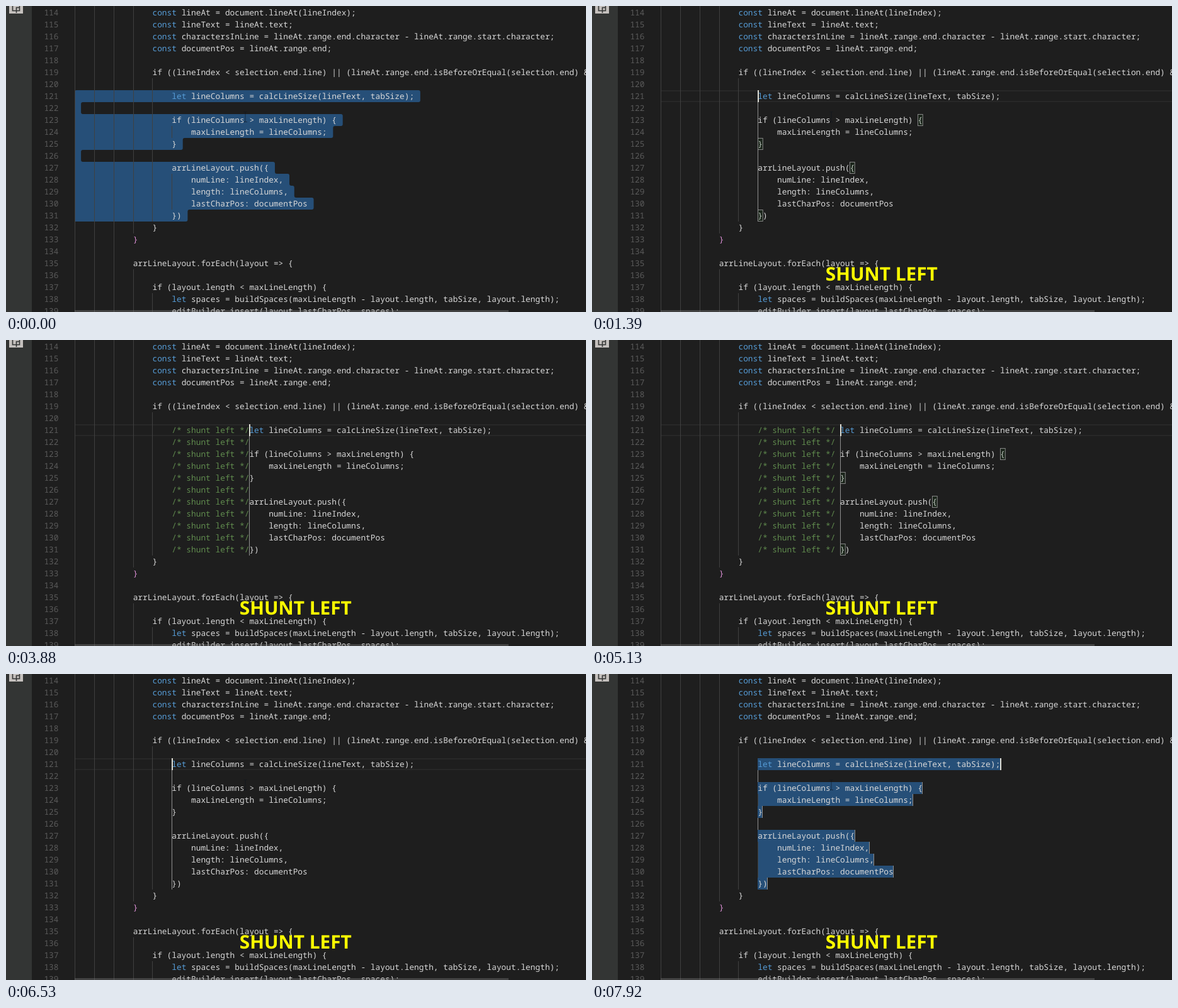
Recreate the animation shown at these times as an HTML page. Size 921 by 487 pixels, loop 8000 ms.

```html
<!DOCTYPE html>
<html lang="en">
<head>
<meta charset="utf-8">
<title>Shunt left</title>
<style>
  html, body { margin: 0; width: 100%; height: 100%; overflow: hidden; background: #1e1e1e; }
  svg { display: block; }
  text { white-space: pre; text-rendering: geometricPrecision; }
  .code { font: 12.83px "Noto Sans Mono", "DejaVu Sans Mono", monospace; fill: #d8d8d8; }
  .code .num { fill: #5a5a5a; }
  .code .key { fill: #569cd6; }
  .code .note { fill: #608b4e; }
  .code .pink { fill: #da8fd4; }
  .title { font: 700 29.8px "Open Sans", "Noto Sans", sans-serif; fill: #ff0; }
</style>
</head>
<body>
<svg id="stage" width="921" height="487" viewBox="0 0 921 487"></svg>
<script>
const LOOP = 8000, LEFT = 109.3, CHAR = 7.697, ROW = 19;
const FIRST = 121, INDENT = 20, TAG = '/* shunt left */';
const stage = document.getElementById('stage');
const timed = [];

const colX = col => LEFT + col * CHAR;
const rowY = line => 1 + (line - 114) * ROW;

function add(parent, tag, attrs = {}, content = '') {
  const el = document.createElementNS('http://www.w3.org/2000/svg', tag);
  for (const name in attrs) el.setAttribute(name, attrs[name]);
  el.textContent = content;
  return parent.appendChild(el);
}
const group = (parent, attrs) => add(parent, 'g', attrs);
const box = (parent, x, y, width, height, fill, more) =>
  add(parent, 'rect', { x, y, width, height, fill, ...more });

// Shows an element only during the given [from, to) spans.
function during(el, ...spans) {
  timed.push({ el, spans });
  return el;
}

// Places each word on the character grid.
function write(parent, line, col, str, cls) {
  for (const m of str.matchAll(/\S+/g)) {
    const kind = cls || (/^(const|let)$/.test(m[0]) ? 'key' : '');
    add(parent, 'text', { x: colX(col + m.index), y: rowY(line) + 14, class: kind }, m[0]);
  }
}

const fixed = [
  [114, 16, 'const lineAt = document.lineAt(lineIndex);'],
  [115, 16, 'const lineText = lineAt.text;'],
  [116, 16, 'const charactersInLine = lineAt.range.end.character - lineAt.range.start.character;'],
  [117, 16, 'const documentPos = lineAt.range.end;'],
  [119, 16, 'if ((lineIndex < selection.end.line) || (lineAt.range.end.isBeforeOrEqual(selection.end) &&'],
  [132, 16, '}'],
  [133, 12, '}', 'pink'],
  [135, 12, 'arrLineLayout.forEach(layout => {'],
  [137, 16, 'if (layout.length < maxLineLength) {'],
  [138, 20, 'let spaces = buildSpaces(maxLineLength - layout.length, tabSize, layout.length);'],
  [139, 20, 'editBuilder.insert(layout.lastCharPos, spaces);']
];
const block = [
  'let lineColumns = calcLineSize(lineText, tabSize);',
  '',
  'if (lineColumns > maxLineLength) {',
  '    maxLineLength = lineColumns;',
  '}',
  '',
  'arrLineLayout.push({',
  '    numLine: lineIndex,',
  '    length: lineColumns,',
  '    lastCharPos: documentPos',
  '})'
];
const lineEnd = str => colX(INDENT + str.length);

// Whole-line selection with rounded steps along its right edge.
function selectionPath() {
  const r = 3, top = rowY(FIRST);
  const edges = block.map(s => (s ? lineEnd(s) : LEFT) + 9.8);
  let d = `M109 ${top + r}Q109 ${top} ${109 + r} ${top}H${edges[0] - r}Q${edges[0]} ${top} ${edges[0]} ${top + r}`;
  edges.forEach((a, i) => {
    const y = top + (i + 1) * ROW, b = edges[i + 1] ?? 109;
    const step = r * Math.sign(b - a);
    d += `V${y - r}Q${a} ${y} ${a + step} ${y}`;
    if (i < edges.length - 1) d += `H${b - step}Q${b} ${y} ${b} ${y + r}`;
  });
  return d + `H109Z`;
}

// One caret per block row; the first is the primary one.
function carets(parent, place) {
  const g = group(parent);
  block.forEach((s, i) => {
    box(g, Math.floor(place(s)), rowY(FIRST + i), i ? 1 : 2, ROW, i ? '#909090' : '#dcdcd4');
  });
  return g;
}

function bracketBoxes(parent, shift) {
  const g = group(parent);
  for (const [line, col] of [[123, 53], [125, 20], [127, 39], [131, 20]]) {
    box(g, Math.floor(colX(col + shift)) + .5, rowY(line) + .5, 7.7, ROW - 1,
      'rgba(0,100,0,.1)', { stroke: '#888' });
  }
  return g;
}

box(stage, 0, 0, 921, 487, '#1e1e1e');
const back = group(stage);
const guides = group(stage);
const code = group(stage, { class: 'code' });
const front = group(stage);

// Backgrounds
during(add(back, 'path', { d: selectionPath(), fill: '#264f78' }), [0, 1390]);
const current = during(group(back), [1390, 7920]);
box(current, 109, 134, 812, 2, '#282828');
box(current, 109, 151, 812, 2, '#282828');
const picked = during(group(back), [7920, LOOP]);
block.forEach((s, i) => {
  if (s) box(picked, 263, rowY(FIRST + i), lineEnd(s) - 263, ROW, '#264f78');
});

// Indent guides: column, first line, last line
const guide = (parent, col, from, to) =>
  box(parent, Math.round(colX(col)), rowY(from), 1, (to - from + 1) * ROW, '#404040');
[[0, 113, 139], [4, 113, 139], [8, 113, 139], [12, 113, 132], [12, 136, 139],
 [16, 120, 131], [16, 138, 139]].forEach(g => guide(guides, ...g));
const inner = during(group(guides), [0, 3880], [6530, LOOP]);
guide(inner, 20, 124, 124);
guide(inner, 20, 128, 130);

// Text
for (let n = 114; n < 140; n++) {
  add(code, 'text', { x: 83.5, y: rowY(n) + 14, 'text-anchor': 'end', class: 'num' }, n);
}
fixed.forEach(row => write(code, ...row));
function blockText(shift) {
  const g = group(code);
  block.forEach((s, i) => {
    if (shift) write(g, FIRST + i, INDENT, TAG, 'note');
    write(g, FIRST + i, INDENT + shift, s);
  });
  return g;
}
during(blockText(0), [0, 3880], [6530, LOOP]);
during(blockText(16), [3880, 5130]);
during(blockText(17), [5130, 6530]);

// Brackets and carets
during(bracketBoxes(front, 0), [1390, 3880]);
during(bracketBoxes(front, 17), [5130, 6530]);
during(box(front, 109, rowY(132), 2, ROW, '#dcdcd4'), [230, 690], [1150, 1390]);
const caretsAt = shift => carets(front, () => colX(INDENT + shift));
during(caretsAt(0), [1390, 1930], [2400, 2940], [3400, 3880], [6530, 7010], [7460, 7920]);
during(caretsAt(16), [3880, 4420], [4890, 5130]);
during(caretsAt(17), [5130, 5610], [6140, 6530]);
during(carets(front, lineEnd), [7920, LOOP]);

// Mouse pointer
add(front, 'path', { d: 'M377 168.5h2.5h1h2.5M380 169v15M377 184.5h6', fill: 'none', stroke: '#10161e', opacity: .6 });

// Side bar, scroll bar and title
box(front, 0, 0, 41, 487, '#333534');
box(front, 5, 0, 22, 12, '#c5c1be');
add(front, 'path', { d: 'M10.5 -2V7.5H21.5V-2M16 2.5H22M16.5 2V11', fill: 'none', stroke: '#333534', 'stroke-width': 1.6 });
box(front, 109, 484, 689, 3, '#797979', { opacity: .4 });
during(add(front, 'text', { x: 370.8, y: 437, class: 'title' }, 'SHUNT LEFT'), [1390, LOOP]);

function draw() {
  const t = performance.now() % LOOP;
  for (const { el, spans } of timed) {
    el.style.display = spans.some(([a, b]) => t >= a && t < b) ? '' : 'none';
  }
  requestAnimationFrame(draw);
}
draw();
</script>
</body>
</html>
```
